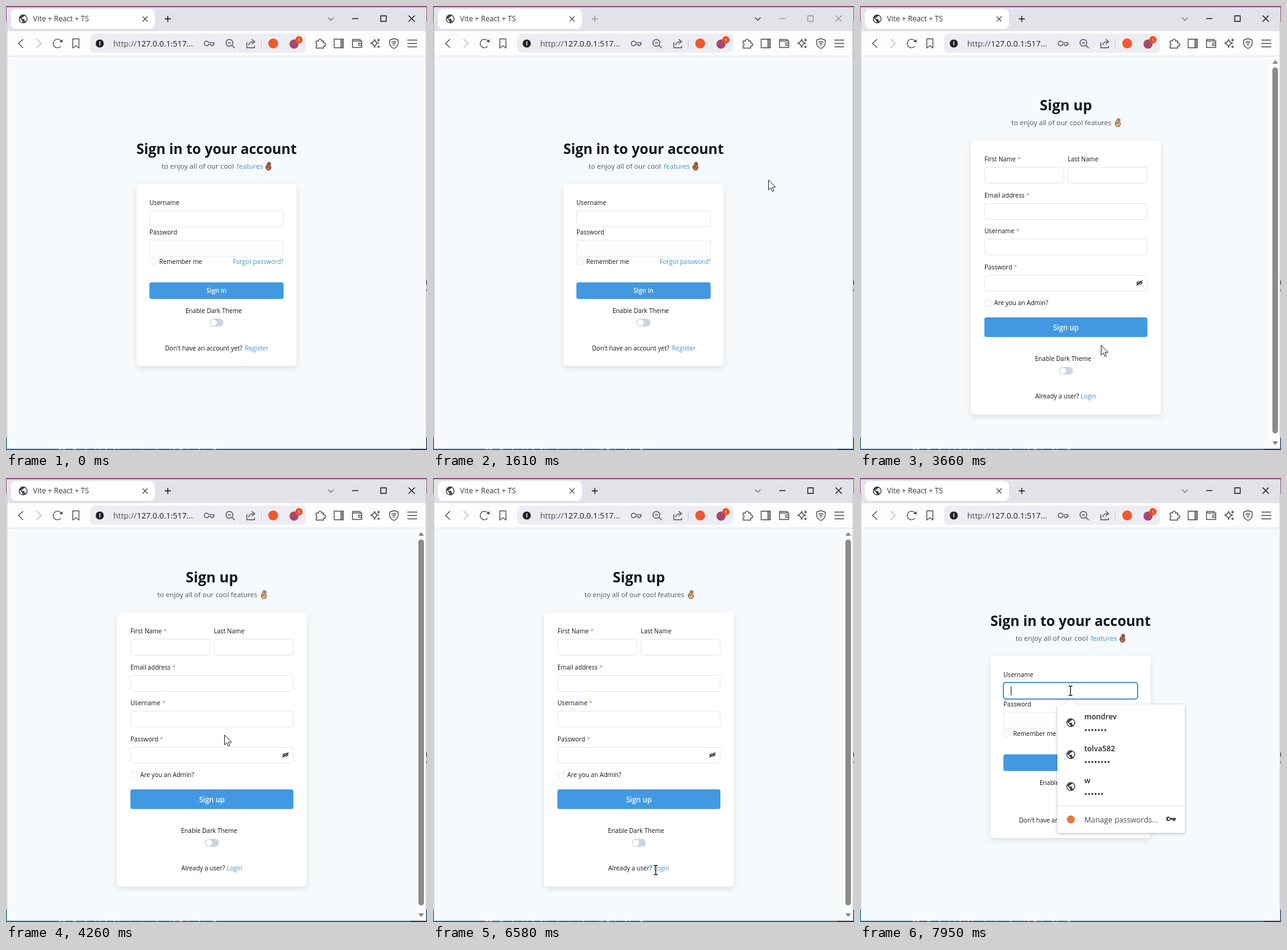
These frames come from a looping animation (687 by 723 pixels, 8 s). An HTML page:

```html
<!DOCTYPE html>
<html lang="en">
<head>
<meta charset="utf-8">
<title>Sign in flow</title>
<style>
html, body { margin: 0; width: 100%; height: 100%; overflow: hidden; background: #f7fafc; }
svg { display: block; width: 687px; height: 723px; }
text { font-family: "Open Sans", "Noto Sans", sans-serif; white-space: pre; }
.icon { fill: none; stroke: #50535b; stroke-width: 1.4; stroke-linejoin: round; }
.solid { fill: #41444b; }
.card { filter: drop-shadow(0 4px 5px rgba(0,0,0,.1)); }
.popup { filter: drop-shadow(0 1px 2px rgba(0,0,0,.3)); }
.field { fill: #fff; stroke: #e2e8f0; }
.field.hover { stroke: #cbd5e0; }
.button { fill: #4299e1; }
.button.hover { fill: #3182ce; }
#controls .icon { stroke: inherit; }
</style>
</head>
<body>
<svg id="stage" viewBox="0 0 687 723" xmlns="http://www.w3.org/2000/svg"></svg>
<script>
const LOOP = 8000, STEP = 69;
const INK = '#11161f', LINK = '#3f93cf', MUTED = '#4a5568';
const POINT = 'data-cursor="point"', BEAM = 'data-cursor="beam"';

// Markup helpers
const text = (x, y, str, size = 10.1, color = INK, weight = 400, extra = '') =>
  `<text x="${x}" y="${y}" font-size="${size}" fill="${color}" font-weight="${weight}" ${extra}>${str}</text>`;
const centered = (x, y, str, size, color, weight) =>
  text(x, y, str, size, color, weight, 'text-anchor="middle"');
const label = (x, y, str) => text(x, y, str, 10.1, INK, 500);
const link = (x, y, str) => text(x, y, str, 10.1, LINK, 400, POINT);
const rect = (x, y, w, h, fill, r = 0, extra = '') =>
  `<rect x="${x}" y="${y}" width="${w}" height="${h}" fill="${fill}" rx="${r}" ${extra}/>`;
const dot = (x, y, r, fill) => `<circle cx="${x}" cy="${y}" r="${r}" fill="${fill}"/>`;
const path = (d, x, y, cls = 'icon', extra = '') =>
  `<path class="${cls}" d="${d}" transform="translate(${x} ${y})" ${extra}/>`;
const row = (x, gap, y, shapes) => shapes.map((d, i) => path(d, x + i * gap, y)).join('');
const group = (id, body) => `<g id="${id}">${body}</g>`;

// Form parts
const card = (x, y, w, h) => rect(x, y, w, h, '#fff', 5, 'class="card"');
const field = (x, y, w) =>
  `<rect class="field" x="${x + .5}" y="${y + .5}" width="${w - 1}" height="26" rx="3.5" ${BEAM}/>`;
const button = (x, y, w, h) =>
  `<rect class="button" x="${x}" y="${y}" width="${w}" height="${h}" rx="3.5" ${POINT}/>`;
const check = (x, y) => rect(x + .5, y + .5, 10, 10, '#fff', 1.5, 'stroke="#e2e8f0"');
const toggle = (x, y) => rect(x, y, 23, 13, '#cbd5e0', 6.5) + dot(x + 6.6, y + 6.5, 5.2, '#fff');

const KEY = 'M-1.4-1.4H7.5V1.4H6V3.6H2.5V1.4H-1.4A3.7 3.7 0 1 1-1.4-1.4Z';
const CROSS = 'M-4-4L4 4M4-4L-4 4';
const LAND = 'M-7.8-1.8L-3 3V4L-1 6V7.9A8 8 0 0 1-7.8-1.8ZM5.9 5.4Q5.4 4 3 4V0H-4V-2H-1V-5H1Q3-5 3-7.4A8 8 0 0 1 5.9 5.4Z';

const globe = (x, y) => `<g transform="translate(${x} ${y}) scale(.72)">${dot(0, 0, 10, '#41444b')}
  <path d="${LAND}" fill="#fff"/></g>`;

const hand = (x, y, skin) => `<g transform="translate(${x} ${y})" fill="${skin}" stroke="#33221c" stroke-width=".8">
  <path d="M-4.2 1L-1.6-3.5L-.6-6Q1-7.4 2-6Q4-6.6 4-4.4L3.2-.6Q5 .6 4.4 3Q3.6 6.6 0 6.6Q-3.6 6-4.2 1Z"/>
  <path d="M1.8-5.6L.6-.6M-2.6 1.2Q.4-.8 1.6 2" fill="none"/></g>`;

function desktop() {
  return rect(0, 0, 687, 723, '#1c6fa6') + rect(0, 0, 687, 26, '#90507d') +
    rect(0, 26, 687, 677, '#e6e8ee') + rect(660, 703, 27, 20, '#123e66') +
    text(75, 719, 'logging  by apply type, property copy gap, typing', 12, '#e4eef5') +
    rect(685.5, 447, 1.5, 7, '#3a3a3a') + rect(685.5, 461, 1.5, 4, '#777');
}

function browser() {
  const nav = ['M4-7L-3.5 0L4 7', 'M-4-7L3.5 0L-4 7', 'M5.4 4.6A7 7 0 1 1 6.7-2', 'M-5-7.5H5V7.5L0 3.8L-5 7.5Z'];
  const actions = [KEY,
    'M4-1A5.5 5.5 0 1 1-7-1A5.5 5.5 0 1 1 4-1M2.6 3L7.4 7.8M-4-1H1',
    'M-7-2V7H5.5V4M-4 3Q-3-3 4-3M1-7L6-3L1 1'];
  const tools = [
    'M-7-4H-2.8A2.4 2.4 0 1 1 1.8-4H5.5V-.4A2.4 2.4 0 1 1 5.5 4V7.5H-7V4A2.3 2.3 0 0 0-7-.4Z',
    'M-7.5-7H7.5V7H-7.5ZM3.5-7V7M5.5-7V7',
    'M5-4V-6.5H-7.5V6.5H7.5V-4H-7.5M7.5-.5H2.5V3H7.5',
    'M-1.5-7Q-.5-1.5 5-.5Q-.5.8-1.5 6.5Q-2.7.8-8-.5Q-2.7-1.5-1.5-7M5-8V-3M2.6-5.5H7.4M5 3.4V7.5M3 5.5H7',
    'M0-8L7-5.5V0Q6.5 5.5 0 8.2Q-6.5 5.5-7 0V-5.5ZM-4-1.5Q0-5 4-1.5M-2.3 1Q0-1 2.3 1M0 2V4',
    'M-8-5.5H8M-8 0H8M-8 5.5H8'];
  const controls = ['M-5 0H5', 'M-4.5-4.5H4.5V4.5H-4.5Z', 'M-5-5L5 5M5-5L-5 5'];

  return rect(1, 2, 685, 719, '#f7fafc') + rect(1, 2, 685, 39, '#e2e3e9') +
    rect(1, 41, 685, 40, '#fdfdfe') + rect(1, 81, 685, 1, '#dfe0e6') +
    '<path id="frame" d="M1.5 26V720.5M685.5 26V720.5" fill="none"/>' +
    rect(8, 5, 235, 32, '#fff', 8) + globe(28, 21) +
    text(44, 25, 'Vite + React + TS', 12, '#36383f') + path(CROSS, 227, 21) +
    path('M-4.5-2.2L0 2.3L4.5-2.2', 530, 21, 'icon', 'id="chevron"') +
    group('controls', path('M-5 0H5M0-5V5', 264, 21) + row(570, 46, 20.5, controls)) +
    row(24, 30, 61, nav) + path('M3-2.2H8.4V-7Z', 84, 61, 'solid') +
    rect(44, 50, 20, 22, '#fdfdfe', 0, 'opacity=".6"') +
    rect(137, 45, 353, 31, '#ecedf2', 8) +
    dot(153, 61, 6.6, '#202126') + rect(152.4, 57.4, 1.4, 6.8, '#fff') +
    text(175, 65.6, '<tspan fill="#4a4c53">http://</tspan>127.0.0.1:517...', 13.1, '#1d1f25') +
    row(332, 34, 61, actions) + rect(416, 53, 1, 17, '#c6c8e0') +
    dot(436, 61, 8, '#f1582c') + dot(470, 62, 7.5, '#a8476b') +
    dot(478, 55, 6, '#e8532a') + centered(478, 58, '1', 8, '#fff') +
    row(513, 30, 61, tools);
}

function signin() {
  const fields = ['Username', 'Password'].map((name, i) =>
    label(234, 324 + 48 * i, name) + field(234, 333 + 48 * i, 219)).join('');
  return centered(343.5, 241, 'Sign in to your account', 22.9, INK, 700) +
    text(254, 265, 'to enjoy all of our cool', 11.4, MUTED) +
    text(376.5, 265, 'features', 11.1, LINK) + hand(428, 261, '#c66f42') +
    card(213, 290, 261, 296) + fields +
    check(234, 410) + text(250, 420, 'Remember me') + link(370, 420, 'Forgot password?') +
    button(234, 450, 219, 27) + centered(343.5, 467, 'Sign in', 10.2, '#fff', 600) +
    label(293, 500, 'Enable Dark Theme') + toggle(332, 509) +
    text(259.5, 561, 'Don\'t have an account yet?') + link(390, 561, 'Register') +
    group('focus', rect(234, 333, 219, 27, 'none', 4, 'stroke="#4a98d3" stroke-width="2"') +
      rect(246, 339, 1, 15, '#111'));
}

function signup() {
  const required = '<tspan fill="#e08a4a" font-weight="400"> *</tspan>';
  const fields = ['First Name', 'Email address', 'Username', 'Password'].map((name, i) => {
    const y = Math.round(253 + 58.6 * i);
    return label(203, y, name + required) + field(203, y + 9, i ? 266 : 130);
  }).join('');
  const eye = path('M-5.4 0Q0-6.4 5.4 0Q0 6.4-5.4 0Z', 456, 451, 'solid') +
    `<circle cx="456" cy="451" r="1.9" fill="none" stroke="#fff"/>
    <path d="M451 455L461 447" stroke="${INK}" stroke-width="1.3"/>`;
  return centered(336, 170, 'Sign up', 23.5, INK, 700) +
    text(247, 194, 'to enjoy all of our cool features', 11.3, MUTED) + hand(420.5, 190, '#efb37c') +
    card(181, 219.5, 310, 445.5) + fields + label(339, 253, 'Last Name') + field(339, 262, 130) + eye +
    check(203, 478) + text(219, 487, 'Are you an Admin?', 10.1, INK, 400, POINT) +
    button(203, 507, 266, 32) + centered(336, 528, 'Sign up', 11.8, '#fff', 600) +
    label(285.5, 578, 'Enable Dark Theme') + toggle(324.5, 587.5) +
    rect(286, 628, 80, 15, 'none', 0, BEAM) + text(286, 639, 'Already a user?') + link(360, 639, 'Login') +
    rect(670, 82, 15, 638, '#fbfcfc') + rect(673, 100, 9, 596, '#8b8b8b', 4.5) +
    path('M-4.5 3H4.5L0-3Z', 677.5, 91, 'solid', 'opacity=".65"') +
    path('M-4.5-3H4.5L0 3Z', 677.5, 712, 'solid', 'opacity=".65"');
}

function popup() {
  const entries = ['mondrev', 'tolva582', 'w'].map((name, i) => {
    const y = 398.5 + i * 52;
    const count = [7, 8, 6][i];
    const dots = Array.from({ length: count }, (_, k) => dot(368.5 + k * 5.3, y + 12, 1.7, '#44474e')).join('');
    return globe(344, y) + text(366, y - 5.7, name, 12.2, '#24262c', 600) + dots;
  }).join('');
  return `<g class="popup">${rect(322, 369, 208, 209, '#fff', 3)}<path d="M333 369.5L343.5 360L354 369.5Z" fill="#fff"/></g>` +
    entries + rect(322, 533, 208, 1, '#dcdde0') + dot(344, 556, 6.5, '#e87838') +
    text(366, 560.5, 'Manage passwords...', 12.3, '#4a4d54') +
    path(KEY, 508, 555, 'solid') + dot(504, 555, 1.7, '#fff');
}

const cursors = group('arrow',
    '<path d="M0 0V16L3.8 12.6L6.2 18.3L8.7 17.2L6.3 11.6H11.5Z" fill="#fff" stroke="#1b2230"/>') +
  group('beam',
    '<path d="M-3-7.5H-.8L0-6.8L.8-7.5H3M0-6.8V6.8M-3 7.5H-.8L0 6.8L.8 7.5H3" fill="none" stroke="#111" stroke-width="1.3"/>') +
  group('point', `<path d="M-1.5 1.5Q0-.8 1.6 1.5V7.5Q3.5 6 4.8 8.2Q6.6 7 7.8 9.2Q10.5 8.4 10.8 11.5V16Q10.4 19 8.8 20.5V23H.4V21
    Q-3 17-5 13Q-5.2 10.6-2.8 11.4L-1.5 13ZM1.6 7.5V12M4.8 8.2V12M7.8 9.2V12" fill="#fff" stroke="#111" stroke-width="1.1" stroke-linejoin="round"/>`);

const stage = document.getElementById('stage');
stage.innerHTML = desktop() + browser() + group('signin', signin()) + group('signup', signup()) +
  group('popup', popup()) + group('cursor', cursors);
const $ = id => document.getElementById(id);
const show = (id, on) => { $(id).style.display = on ? '' : 'none'; };

// Pointer moves: start, end, then evenly timed waypoints
const ENTRY = [672, 200];
const MOVES = [
  [980, 1730, [522, 299]],
  [1800, 1870, [515, 307]],
  [2150, 2900, [391, 370], [374, 505], [373, 510]],
  [2970, 3180, [396, 551]],
  [3380, 3720, [392, 552]],
  [4120, 4900, [356, 418], [316, 270], [259, 350], [237, 405]],
  [4960, 5580, [192, 445], [330, 492], [224, 485]],
  [5760, 6510, [300, 525], [363, 638]],
  [6660, 6800, [374, 637]],
  [7060, 7340, [341, 402]],
  [7410, 7550, [343, 346]]
];

// The pointer advances in equal steps, the first one at the start of each move.
function pointer(t) {
  const n = MOVES.filter(m => t >= m[0]).length;
  if (!n) return ENTRY;
  const [from, to, ...way] = MOVES[n - 1];
  const steps = Math.round((to - from) / STEP) + 1;
  const done = Math.floor((t - from) / (to - from) * (steps - 1) + .1) + 1;
  const pos = Math.min(1, done / steps) * way.length;
  const i = Math.min(way.length - 1, Math.floor(pos));
  const start = i ? way[i - 1] : n > 1 ? MOVES[n - 2].at(-1) : ENTRY;
  return start.map((v, axis) => Math.round(v + (way[i][axis] - v) * (pos - i)));
}

function render(t) {
  const active = t < 250 || t >= 3380;
  const page = t >= 3520 && t < 7000 ? 'signup' : 'signin';
  const [px, py] = pointer(t);
  const over = el => {
    const b = el.getBBox();
    return px >= b.x && px < b.x + b.width && py >= b.y && py < b.y + b.height;
  };

  $('controls').style.stroke = active ? '#17181c' : '#96979d';
  $('chevron').style.stroke = active ? '#74767e' : '#383a42';
  $('frame').style.stroke = active ? '#b7bac6' : '#9da1aa';
  show('signin', page === 'signin');
  show('signup', page === 'signup');
  show('focus', t >= 7880);
  show('popup', t >= 7950);
  show('cursor', t >= MOVES[0][0]);

  const targets = [...$(page).querySelectorAll('[data-cursor]')];
  const hit = targets.find(over);
  targets.forEach(el => el.classList.toggle('hover', el === hit));
  const kind = hit ? hit.dataset.cursor : 'arrow';
  ['arrow', 'beam', 'point'].forEach(id => show(id, id === kind));
  $('cursor').setAttribute('transform', `translate(${px + .5} ${py + .5})`);
}

function tick(now) {
  render(now % LOOP);
  requestAnimationFrame(tick);
}
render(0);
requestAnimationFrame(tick);
</script>
</body>
</html>
```
